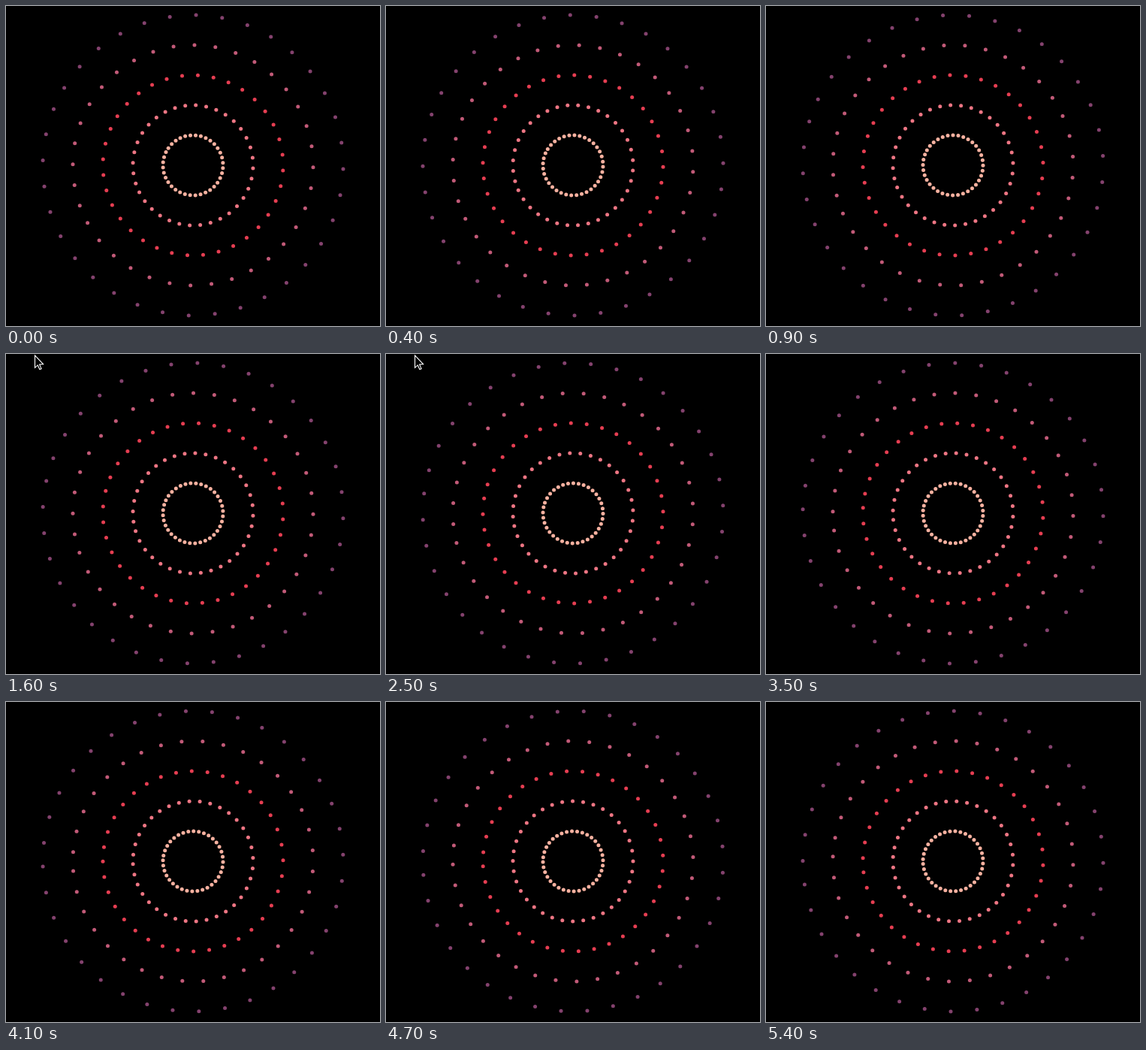
Write an HTML page with a canvas that moves like this. It is 498 px wide and 426 px high and loops after 5500 ms.

```html
<!DOCTYPE html>
<html lang="en">
<head>
<meta charset="utf-8">
<title>Counter-rotating rings</title>
<style>
  html, body { margin: 0; width: 100%; height: 100%; overflow: hidden; background: #000; }
  canvas { display: block; }
</style>
</head>
<body>
<canvas id="stage" width="498" height="426"></canvas>
<script>
const ctx = document.getElementById('stage').getContext('2d');
const LOOP = 5500, TICK = 100;
const CX = 249, CY = 212, GAP = 40, DOT = 2.5;
const DOTS = 36, STEP = 0.175;             // radians; slightly over a full turn
const RAD = Math.PI / 180;
const COLORS = ['#f8b1a0', '#ee7684', '#e63e52', '#c25a78', '#84426e'];
const START = { odd: 211, even: 159.45 };  // degrees

// [ms, degrees turned]
const TURN = [[0, 0], [900, 5], [1600, 9.5], [2500, 14.4], [3500, 20.4], [4100, 23.95], [5400, 30.87]];
const CURSOR = { from: 1100, to: 2800 };
const ARROW = [[38.5, 1.8], [38.5, 18.3], [42.2, 14.9], [44.9, 20.6], [47.1, 19.6], [44.6, 13.9], [49.6, 13.5]];

function turnAt(t) {
  let i = 1;
  while (i < TURN.length - 1 && t > TURN[i][0]) i++;
  const [t0, a0] = TURN[i - 1], [t1, a1] = TURN[i];
  return a0 + (a1 - a0) * (t - t0) / (t1 - t0);
}

function drawRing(n, turn) {
  const odd = n % 2 === 1;
  // each ring picks up the angle where the one outside it ended
  const carry = (5 - n) * (DOTS * STEP - 2 * Math.PI);
  const base = (odd ? START.odd - turn : START.even + turn) * RAD + carry;
  ctx.fillStyle = COLORS[n - 1];
  for (let i = 0; i < DOTS; i++) {
    const a = base + i * STEP;
    ctx.beginPath();
    ctx.arc(CX + n * GAP * Math.cos(a), CY + n * GAP * Math.sin(a), DOT, 0, 2 * Math.PI);
    ctx.fill();
  }
}

function drawCursor() {
  ctx.beginPath();
  ARROW.forEach(([x, y]) => ctx.lineTo(x, y));
  ctx.closePath();
  ctx.fillStyle = '#000';
  ctx.fill();
  ctx.strokeStyle = '#fff';
  ctx.lineWidth = 1.1;
  ctx.stroke();
}

function draw(now) {
  const t = Math.floor((now % LOOP) / TICK) * TICK;
  ctx.fillStyle = '#000';
  ctx.fillRect(0, 0, 498, 426);
  const turn = turnAt(t);
  for (let n = 1; n <= 5; n++) drawRing(n, turn);
  if (t >= CURSOR.from && t < CURSOR.to) drawCursor();
}

const begin = performance.now();
function loop() {
  draw(performance.now() - begin);
  requestAnimationFrame(loop);
}
loop();
</script>
</body>
</html>
```
